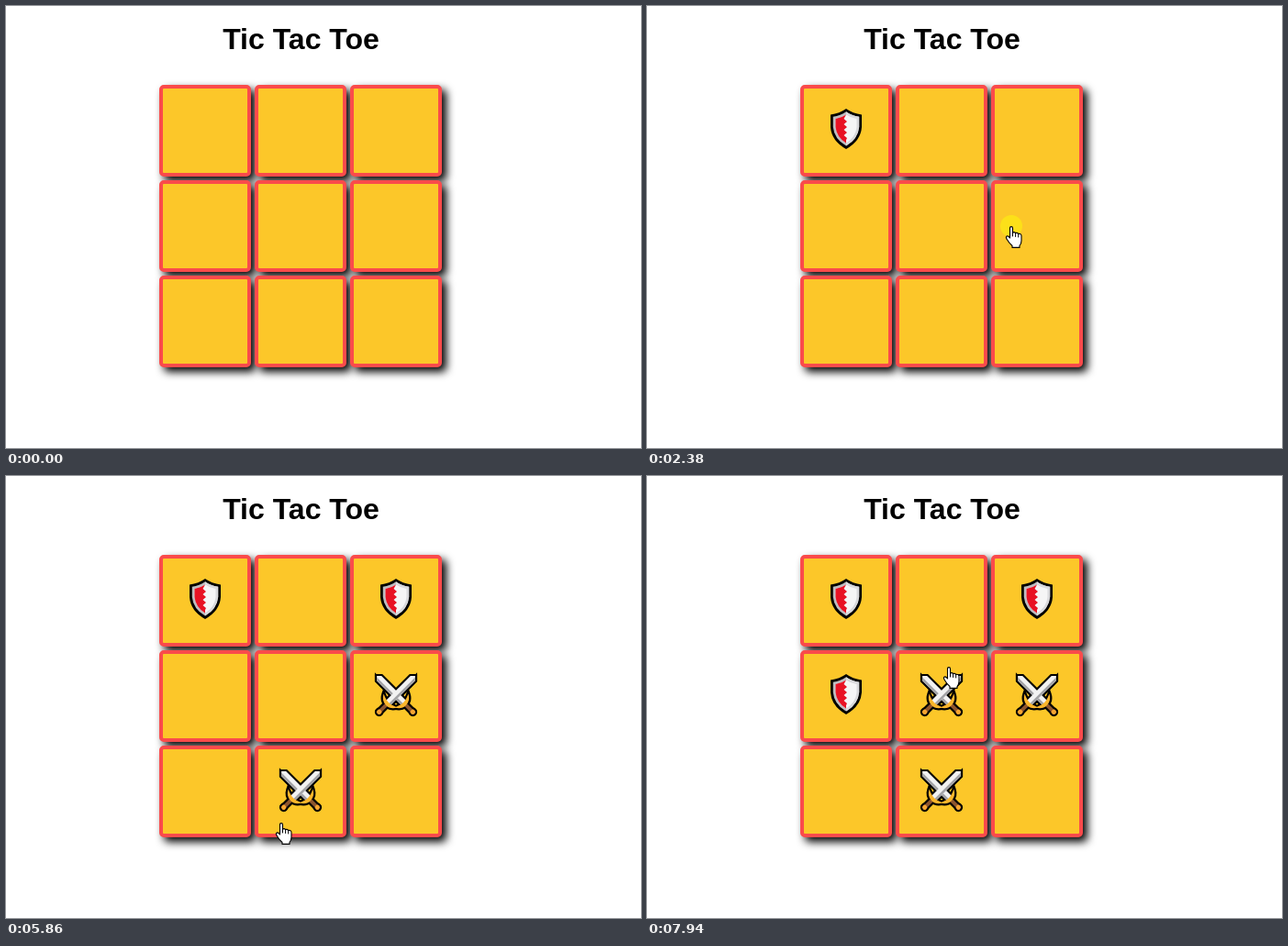
Animation, 692 px wide and 482 px high, one loop 8 s. Source, as an HTML page:

```html
<!DOCTYPE html>
<html lang="en">
<head>
<meta charset="utf-8">
<title>Tic Tac Toe</title>
<style>
  html, body { margin: 0; width: 100%; height: 100%; overflow: hidden; background: #fff; }
  h1 {
    position: absolute; left: 0; top: 18px; width: 643px; margin: 0;
    font: bold 32px/37px "Liberation Sans", Arial, sans-serif; text-align: center; color: #000;
  }
  #board {
    position: absolute; left: 167px; top: 86px;
    display: grid; grid-template-columns: repeat(3, 100px); grid-auto-rows: 100px; gap: 4px;
  }
  #board div {
    box-sizing: border-box; border: 4px solid #fa4b4b; border-radius: 5px;
    background: #fcc729; box-shadow: 5px 5px 10px #000;
  }
  svg { position: absolute; left: 0; top: 0; }
</style>
</head>
<body>
<h1>Tic Tac Toe</h1>
<div id="board"></div>
<svg width="692" height="482">
  <defs>
    <g id="shield">
      <path d="M17 0Q24 5 34 6.500V20Q33 35 17 44Q1 35 0 20V6.500Q10 5 17 0Z"/>
      <path fill="#bdbdc0" d="M17 3.200Q23 7.500 31.200 8.800V20Q30 33 17 40.600Q4 33 2.800 20V8.800Q11 7.500 17 3.200Z"/>
      <path fill="#d9d9dc" d="M17 3.200Q23 7.500 31.200 8.800V20Q30 33 17 40.600Z"/>
      <path fill="#f5f5f6" d="M17 6.500Q22 10 28.500 11V20Q27.500 31 17 37.500Q6.500 31 5.500 20V11Q12 10 17 6.500Z"/>
      <path fill="#e81224" d="M17 6.500Q12 10 5.500 11V20Q6.500 31 17 37.500V34L18 32L14.500 29L18 26L14.500 23L18 20L14.500 17L18 14L14.500 11Z"/>
    </g>
    <!-- A sword along the x axis, tip towards the origin -->
    <g id="sword">
      <path fill="#8e562e" d="M45 -2H58V2H45Z"/>
      <circle cx="58.500" cy="0" r="2.600" fill="#f7a531"/>
      <path fill="#f2f2f2" d="M3 0L6.600 -3.600H45V3.600H6.600Z"/>
      <path fill="#a3a3a6" d="M4 1H45V3.600H6.600Z"/>
      <path fill="#fbb62b" d="M41 -10.500Q44 -4 44 0T41 10.500Q48 7 48 0T41 -10.500Z"/>
    </g>
    <g id="crossed">
      <use href="#sword" transform="rotate(45)"/>
      <use href="#sword" transform="translate(46) rotate(135) scale(1 -1)"/>
    </g>
    <g id="swords">
      <use href="#crossed" stroke="#000" stroke-width="4.400"/>
      <use href="#crossed"/>
    </g>
  </defs>
  <g id="pieces"></g>
  <circle id="ring" r="12" fill="#fce019"/>
  <g id="hand" stroke="#000" stroke-linejoin="round" stroke-linecap="round">
    <path fill="#fff" stroke-width="1.1" d="M-1.500 13V2.200Q-1.500 .6 0 .6T1.500 2.200V7.200Q3.300 6 4.600 7.600Q6.600 6.800 7.700 8.500Q10.500 7.800 11 10.500V16Q11 19 9 21.500V23.400H1V21.500Q-2.500 18.500 -5 14Q-6.200 11.800 -4.900 11Q-3.300 10.300 -1.500 13Z"/>
    <path fill="none" d="M1.500 7V11M4.600 8V11.500M7.700 9V12"/>
  </g>
</svg>
<script>
const LOOP = 8000, PITCH = 104, STEP = 70;
const $ = id => document.getElementById(id);
const show = (element, on) => element.setAttribute("visibility", on ? "visible" : "hidden");

// The pointer glides to a point, bending towards another, then may press there to place a piece.
const moves = [
  { start: 200, end: 330, to: [301, 191], bend: [235, 430] },
  { start: 600, end: 940, to: [215, 152], bend: [225, 200], press: 1360, place: 1560 },
  { start: 1760, end: 2180, to: [397, 240], bend: [360, 105], press: 2380, place: 2580 },
  { start: 3040, end: 3390, to: [420, 151], bend: [400, 185], press: 3650, place: 3850 },
  { start: 4580, end: 4920, to: [318, 380], bend: [398, 181], press: 5120, place: 5330 },
  { start: 5860, end: 6270, to: [206, 243], bend: [312, 416], press: 6470, place: 6670 },
  { start: 7200, end: 7480, to: [329, 208], bend: [183, 260], press: 7680, place: 7940 }
];
const offstage = [1347, 1820];
moves.forEach((move, i) => move.from = i ? moves[i - 1].to : offstage);

// Shields and swords take turns in the cell that was pressed.
const turns = moves.filter(move => move.press);
turns.forEach((turn, i) => {
  const [col, row] = [Math.floor((turn.to[0] - 167) / PITCH), Math.floor((turn.to[1] - 86) / PITCH)];
  const isShield = i % 2 === 0;
  turn.piece = document.createElementNS("http://www.w3.org/2000/svg", "use");
  turn.piece.setAttribute("href", isShield ? "#shield" : "#swords");
  turn.piece.setAttribute("x", PITCH * col + (isShield ? 200 : 194));
  turn.piece.setAttribute("y", PITCH * row + 112);
  $("pieces").append(turn.piece);
});

for (let i = 0; i < 9; i++) $("board").append(document.createElement("div"));

function pointerAt(t) {
  const move = moves.findLast(m => t >= m.start);
  if (!move) return null;
  const { start, end, from, bend, to } = move;
  const gaps = Math.round((end - start) / STEP);
  const step = Math.min(gaps, Math.floor((t - start) / (end - start) * gaps + 0.15));
  const e = 1 - (1 - (step + 1) / (gaps + 1)) ** 3;
  return to.map((goal, axis) =>
    Math.round((1 - e) ** 2 * from[axis] + 2 * e * (1 - e) * bend[axis] + e * e * goal));
}

function draw(t) {
  const pointer = pointerAt(t);
  show($("hand"), pointer);
  show($("ring"), turns.some(turn => t >= turn.press && t < turn.place));
  for (const turn of turns) show(turn.piece, t >= turn.place);
  if (pointer) {
    for (const id of ["hand", "ring"]) $(id).setAttribute("transform", `translate(${pointer})`);
  }
}

const begin = performance.now();
function tick() {
  draw((performance.now() - begin) % LOOP);
  requestAnimationFrame(tick);
}
tick();
</script>
</body>
</html>
```
